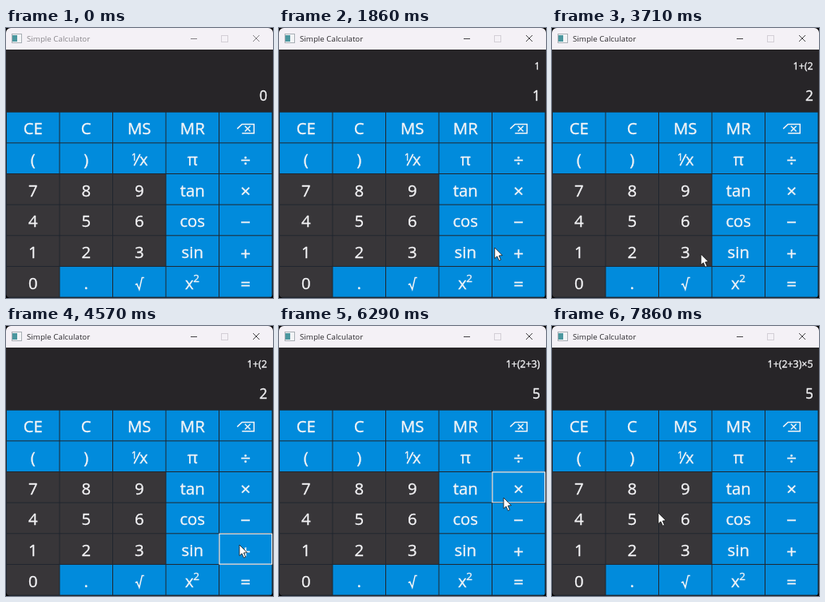
Animation of 334 by 338 pixels, one loop 8 s. Source, as an HTML page with a canvas:

```html
<!DOCTYPE html>
<html lang="en">
<head>
<meta charset="utf-8">
<title>Simple Calculator</title>
<style>
html, body { margin: 0; width: 100%; height: 100%; overflow: hidden; background: #000; }
canvas { display: block; width: 334px; height: 338px; }
</style>
</head>
<body>
<canvas id="stage" width="334" height="338"></canvas>
<script>
const ctx = document.getElementById('stage').getContext('2d');
const W = 334, H = 338, LOOP = 8000, STEPS = 56, ACTIVE_FROM = 10;
const FONT = '"Open Sans", "Noto Sans", sans-serif';
const BLUE = '#018bdc', DARK = '#383639', PANEL = '#272528', WHITE = '#f4f4f6';
const GRID = { x: 0.5, y: 105.2, w: 66.5, h: 38.65 };
const KEYS = [
  ['CE', 'C', 'MS', 'MR', 'back'],
  ['(', ')', 'inverse', 'π', '÷'],
  ['7', '8', '9', 'tan', '×'],
  ['4', '5', '6', 'cos', '−'],
  ['1', '2', '3', 'sin', '+'],
  ['0', '.', 'root', 'square', '=']
];

// Pointer stops; each key is pressed on leaving
const VISITS = [
  { key: '1', arrive: 5, leave: 11, x: 44, y: 283 },
  { key: '+', arrive: 14, leave: 17, x: 298, y: 274 },
  { key: '(', arrive: 19, leave: 20, x: 59, y: 171 },
  { key: '2', arrive: 23, leave: 25, x: 104, y: 290 },
  { key: '+', arrive: 29, leave: 33, x: 292, y: 274 },
  { key: '3', arrive: 35, leave: 37, x: 164, y: 285 },
  { key: ')', arrive: 39, leave: 41, x: 101, y: 172 },
  { key: '×', arrive: 44, leave: 47, x: 281, y: 215 },
  { key: '5', arrive: 50, leave: 53, x: 105, y: 243 },
  { key: '', arrive: 55, leave: STEPS, x: 133, y: 234 }
];

function text(str, x, y, size, color = WHITE, align = 'center', weight = 0.35) {
  ctx.font = `${size}px ${FONT}`;
  ctx.fillStyle = ctx.strokeStyle = color;
  ctx.lineWidth = weight;
  ctx.lineJoin = 'round';
  ctx.textAlign = align;
  ctx.fillText(str, x, y);
  if (weight) ctx.strokeText(str, x, y);
}

function rect(color, x, y, w, h) {
  ctx.fillStyle = color;
  ctx.fillRect(x, y, w, h);
}

function line(color, width, ...lines) {
  ctx.strokeStyle = color;
  ctx.lineWidth = width;
  ctx.lineJoin = 'miter';
  ctx.beginPath();
  for (const pts of lines) pts.forEach(p => p === pts[0] ? ctx.moveTo(...p) : ctx.lineTo(...p));
  ctx.stroke();
}

function cross(color, width, x, y, r) {
  line(color, width, [[x - r, y - r], [x + r, y + r]], [[x + r, y - r], [x - r, y + r]]);
}

const glyphs = {
  back(x, y) {
    const tip = [x - 10.5, y], top = [x - 4.5, y - 5.7];
    line(WHITE, 1.5, [tip, top, [x + 10.5, y - 5.7], [x + 10.5, y + 5.7], [x - 4.5, y + 5.7], tip, top]);
    cross(WHITE, 1.5, x + 2.5, y, 3.4);
  },
  inverse(x, y) {
    text('1', x - 6.5, y + 1, 12.5);
    line(WHITE, 1.7, [[x - 6.5, y + 7.5], [x + 1, y - 7]]);
    text('x', x + 5.5, y + 7.2, 20);
  },
  root(x, y) {
    line(WHITE, 1.5, [[x - 5, y + 2], [x - 3, y + 1], [x, y + 8], [x + 3.5, y - 7], [x + 6, y - 7]]);
  },
  square(x, y) {
    text('x', x - 4, y + 7.2, 20.5);
    text('2', x + 4.8, y - 1.8, 13.5);
  }
};

function cell(col, row) {
  return [GRID.x + col * GRID.w, GRID.y + row * GRID.h];
}

function drawKey(key, col, row) {
  const [x, y] = cell(col, row);
  const cx = x + GRID.w / 2, cy = y + GRID.h / 2;
  rect(/^\d$/.test(key) ? DARK : BLUE, x + 0.5, y + 0.5, GRID.w - 1, GRID.h - 1);
  if (glyphs[key]) glyphs[key](cx, cy + 1.6);
  else if ('÷×−+='.includes(key)) text(key, cx, cy + 10.6, 22.5);
  else text(key, cx, cy + 8.8, 20.3);
}

function drawTitle(active) {
  const mark = active ? '#454347' : '#858287';
  rect('#f4f1f6', 0, 0, W, 27);
  rect('#a9afb5', 7, 7, 13, 12);
  rect('#f2f4f6', 8, 8, 11, 10);
  rect('#4b979f', 8, 9, 6, 8);
  text('Simple Calculator', 26, 17, 9.75, active ? '#2b292d' : '#89868b', 'left', 0);
  line(mark, 1, [[231, 13.5], [239, 13.5]]);
  ctx.strokeStyle = '#d3cfd6';
  ctx.strokeRect(269.5, 9.5, 8, 8);
  cross(mark, 1, 313, 13, 4);
}

function drawHover(step) {
  const stop = VISITS.find(v => v.key && step >= v.arrive && step <= v.leave);
  if (!stop) return;
  const row = KEYS.findIndex(keys => keys.includes(stop.key));
  const [x, y] = cell(KEYS[row].indexOf(stop.key), row);
  ctx.strokeStyle = WHITE;
  ctx.lineWidth = 1.2;
  ctx.strokeRect(x + 0.4, y + 0.4, GRID.w - 0.8, GRID.h - 0.8);
}

function pointerAt(step) {
  const i = VISITS.findIndex(v => step <= v.leave);
  const to = VISITS[i], from = VISITS[i - 1];
  if (!from || step >= to.arrive) return [to.x, to.y];
  const u = (step - from.leave) / (to.arrive - from.leave), e = u * (2 - u);
  return [from.x + (to.x - from.x) * e, from.y + (to.y - from.y) * e];
}

function drawPointer(step) {
  const [x, y] = pointerAt(step);
  ctx.beginPath();
  [[0, 0], [0, 13.5], [3.1, 10.8], [5.5, 16.2], [7.7, 15.2], [5.4, 10], [9.5, 9.6]]
    .forEach(([dx, dy]) => ctx.lineTo(x + dx, y + dy));
  ctx.closePath();
  ctx.fillStyle = '#fff';
  ctx.fill();
  ctx.strokeStyle = '#151515';
  ctx.lineWidth = 0.8;
  ctx.stroke();
}

function drawDisplay(step) {
  let formula = '', value = '0';
  for (const { key, leave } of VISITS) {
    if (leave > step) break;
    formula += key;
    if (/\d/.test(key)) value = key;
    if (key === ')') value = formula.match(/\((.*)\)/)[1].split('+').reduce((sum, n) => sum + +n, 0);
  }
  text(formula, 326.5, 51.5, 12.4, WHITE, 'right');
  text(value, 327, 91, 17.3, WHITE, 'right');
}

function draw(step) {
  const active = step >= ACTIVE_FROM;
  rect('#000', 0, 0, W, H);
  ctx.save();
  ctx.beginPath();
  ctx.roundRect(0, 0, W, H, 6);
  ctx.clip();
  rect(PANEL, 0, 0, W, H);
  drawTitle(active);
  drawDisplay(step);
  rect('#20262e', 0, 105, W, H - 105);
  KEYS.forEach((keys, row) => keys.forEach((key, col) => drawKey(key, col, row)));
  drawHover(step);
  if (active) drawPointer(step);
  ctx.restore();
}

function tick() {
  const t = performance.now() % LOOP;
  draw(Math.floor((t + 5) / LOOP * STEPS) % STEPS);
  requestAnimationFrame(tick);
}
tick();
</script>
</body>
</html>
```
